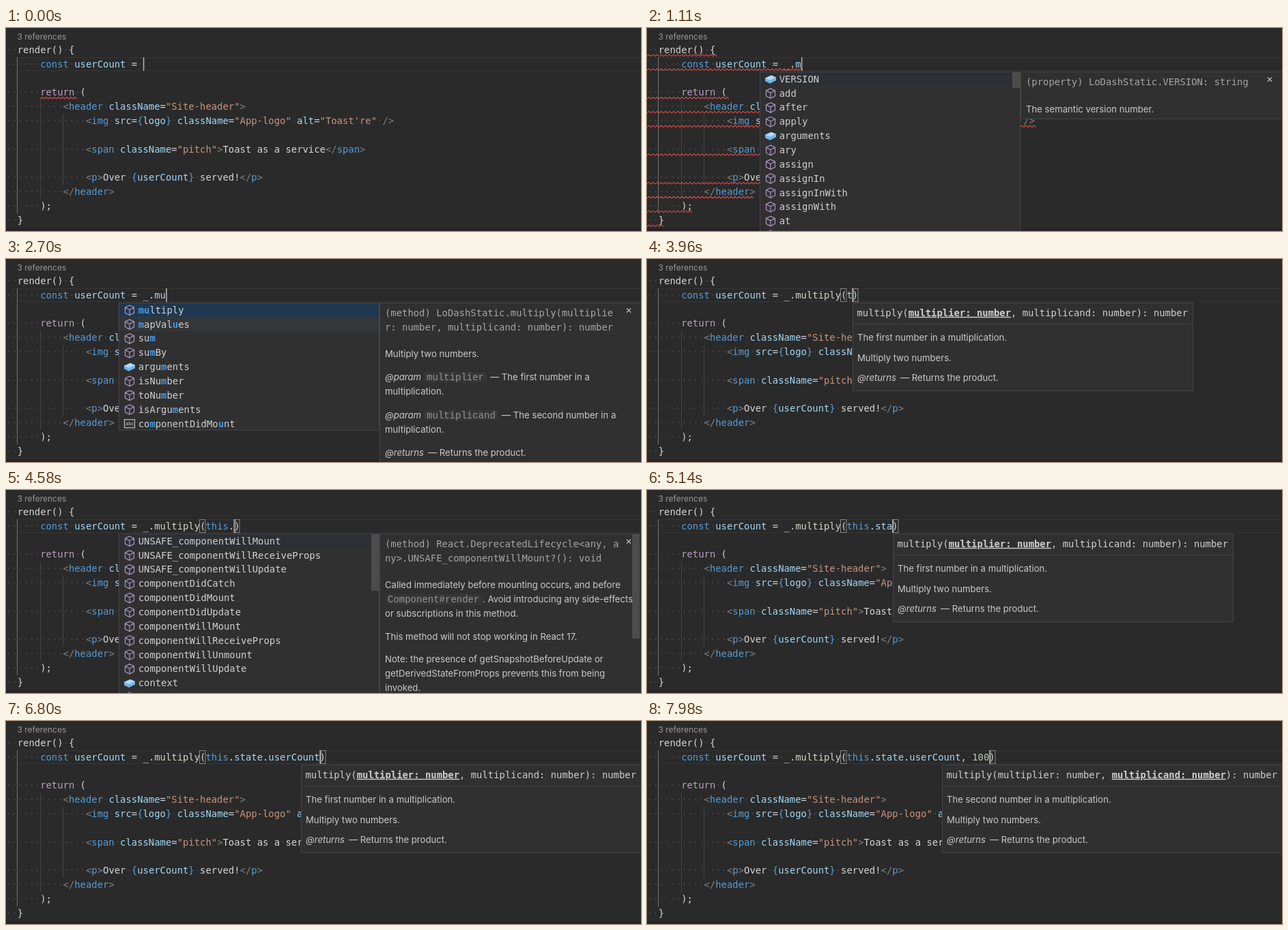
These frames come from a looping animation (930x298 px, 8000 ms). An HTML page:

```html
<!DOCTYPE html>
<html lang="en">
<head>
<meta charset="utf-8">
<title>Editor autocomplete</title>
<style>
html, body { margin: 0; width: 100%; height: 100%; overflow: hidden; background: #2a2a2a; }
svg { display: block; width: 930px; height: 298px; }
text { white-space: pre; fill: #d0d0d0; }
.mono { font: 13.887px "DejaVu Sans Mono", monospace; }
.sans { font: 13.15px Inter, sans-serif; fill: #cacaca; }
.ital { font-style: italic; }
.pill { font: 14px "Liberation Mono", monospace; fill: #959595; }
.lens { font: 12px Inter, sans-serif; fill: #999; }
.dim { fill: #a6a6a6; }
.w { fill: #d6d6d6; } .b { fill: #569cd6; } .v { fill: #a2d8f4; } .f { fill: #d4d5c6; }
.k { fill: #b8a0bc; } .s { fill: #c8957e; } .g { fill: #808080; } .n { fill: #b9c8ae; }
.dot { fill: #444; }
.hit { fill: #429ae8; font-weight: bold; }
.on { font-weight: bold; text-decoration: underline; }
.panel { fill: #303031; stroke: #454545; }
.thumb { fill: #4c4c4d; }
.wave { fill: none; stroke: #d84848; stroke-width: 1.1; }
</style>
</head>
<body>
<svg viewBox="0 0 930 298">
  <defs>
    <path id="cube" d="M0-7 6.5-4V4L0 7.5-6.5 4V-4ZM-6.5-4 0-.5 6.5-4M0-.5V7.5" fill="none" stroke="#a68fbc" stroke-width="1.3"/>
    <g id="brick">
      <path d="M-8-1.500 1-5.500 8-2.500V2L-1 6.500-8 3Z" fill="#72b3ea"/>
      <path d="M-8-1.500 1-5.500 8-2.500-1 1.500Z" fill="#b4daf6"/>
    </g>
    <g id="abc">
      <rect x="-7.5" y="-6" width="15" height="12" fill="none" stroke="#bbb" stroke-width="1.2"/>
      <text x="-6" y="2.6" style="font: 7px 'DejaVu Sans', sans-serif">abc</text>
    </g>
  </defs>
  <g id="stage"></g>
</svg>
<script>
const LOOP = 8000, CH = 8.361, LEFT = 16.7, ROW = 20.84, BASE = 4.8;
const rowY = i => 32 + i * ROW;

// "~x" switches to colour class x
const CODE = [
  "~wrender() {", null, null,
  "    ~kreturn ~w(",
  "        ~g<~bheader ~vclassName~w=~s\"Site-header\"~g>",
  "            ~g<~bimg ~vsrc~w=~b{~vlogo~b} ~vclassName~w=~s\"App-logo\" ~valt~w=~s\"Toast're\" ~g/>",
  null,
  "            ~g<~bspan ~vclassName~w=~s\"pitch\"~g>~wToast as a service~g</~bspan~g>",
  null,
  "            ~g<~bp~g>~wOver ~b{~vuserCount~b} ~wserved!~g</~bp~g>",
  "        ~g</~bheader~g>",
  "    ~w);", "~w}"
];

// [time, text before the caret, open popups]
const STEPS = [
  [0, ""], [240, "_"], [480, "_."], [560, "_.", "all"], [1030, "_.m", "all"], [1270, "_.mu", "mu"],
  [2780, "_.multiply"], [3000, "_.multiply(", "sig"], [3880, "_.multiply(t", "sig"],
  [4040, "_.multiply(th", "sig"], [4120, "_.multiply(thi", "sig"], [4200, "_.multiply(this", "sig"],
  [4360, "_.multiply(this.", "sig"], [4440, "_.multiply(this.", "sig life"],
  [4900, "_.multiply(this.s", "sig"], [4980, "_.multiply(this.st", "sig"],
  [5060, "_.multiply(this.sta", "sig"], [5220, "_.multiply(this.stat", "sig"],
  [5300, "_.multiply(this.state", "sig"], [5460, "_.multiply(this.state.", "sig"],
  [5620, "_.multiply(this.state.", "sig state"],
  [6560, "_.multiply(this.state.userCount", "sig"],
  [7360, "_.multiply(this.state.userCount,", "sig"], [7440, "_.multiply(this.state.userCount, ", "sig"],
  [7660, "_.multiply(this.state.userCount, 1", "sig"], [7740, "_.multiply(this.state.userCount, 10", "sig"],
  [7900, "_.multiply(this.state.userCount, 100", "sig"]
];

// Items: "=" marks a property, "#" a plain word, [x] a matched letter
const LISTS = {
  all: {
    items: "=VERSION add after apply =arguments ary assign assignIn assignInWith assignWith at attempt",
    fill: "#2c2f33", thumb: 24, bottom: 134,
    docs: [[555, 79, "mono dim", "(property) LoDashStatic.VERSION: string"],
      [555, 119, "sans", "The semantic version number."]]
  },
  mu: {
    items: "[mu]ltiply [m]apVal[u]es su[m] su[m]By =argu[m]ents isNu[m]ber toNu[m]ber isArgu[m]ents #co[m]ponentDidMo[u]nt",
    fill: "#1f3850", hover: true, bottom: 310,
    docs: [[555, 79, "mono dim", "(method) LoDashStatic.multiply(multiplie"],
      [555, 100, "mono dim", "r: number, multiplicand: number): number"],
      [555, 139, "sans", "Multiply two numbers."],
      [555, 173, "sans ital", "@param"], [616, 173, "pill", "multiplier"],
      [709, 173, "sans", "— The first number in a"], [555, 194, "sans", "multiplication."],
      [555, 229, "sans ital", "@param"], [616, 229, "pill", "multiplicand"],
      [726, 229, "sans", "— The second number in a"], [555, 250, "sans", "multiplication."],
      [555, 284, "sans ital", "@returns"], [618, 284, "sans", "— Returns the product."]]
  },
  life: {
    items: "UNSAFE_componentWillMount UNSAFE_componentWillReceiveProps UNSAFE_componentWillUpdate componentDidCatch " +
      "componentDidMount componentDidUpdate componentWillMount componentWillReceiveProps componentWillUnmount " +
      "componentWillUpdate =context forceUpdate",
    fill: "#2c2f33", thumb: 84, bottom: 310, docsThumb: true,
    docs: [[555, 79, "mono dim", "(method) React.DeprecatedLifecycle<any, a"],
      [555, 100, "mono dim", "ny>.UNSAFE_componentWillMount?(): void"],
      [555, 139, "sans", "Called immediately before mounting occurs, and before"],
      [559, 160, "pill", "Component#render"], [698, 160, "sans", ". Avoid introducing any side-effects"],
      [555, 181, "sans", "or subscriptions in this method."],
      [555, 215, "sans", "This method will not stop working in React 17."],
      [555, 248, "sans", "Note: the presence of getSnapshotBeforeUpdate or"],
      [555, 269, "sans", "getDerivedStateFromProps prevents this from being"],
      [555, 290, "sans", "invoked."]]
  },
  state: {
    items: "=userCount #Component #React #SiteHeader #_ #alt #api #className #componentDidMount #getUserCount #header #img",
    fill: "#1f3850", thumb: 136, bottom: 104,
    docs: [[555, 79, "mono dim", "(property) userCount: any"]]
  }
};

const esc = s => s.replace(/&/g, "&amp;").replace(/</g, "&lt;");
const raw = (x, y, cls, html) => `<text x="${x}" y="${y + BASE}" class="${cls}">${html}</text>`;
const rect = (x, y, w, h, attrs) => `<rect x="${x}" y="${y}" width="${w}" height="${h}" ${attrs}/>`;
const panel = (x, y, w, h) => rect(x + .5, y + .5, w - 1, h - 1, 'class="panel"');
const span = (cls, s) => `<tspan class="${cls}">${s}</tspan>`;

function label(x, y, cls, s) {
  const box = cls === "pill" ? rect(x - 4, y - 7, s.length * 8.4 + 8, 15, 'rx="3" fill="#363637"') : "";
  return box + raw(x, y, cls, esc(s));
}

function codeLine(i, src) {
  const html = ("  " + src).split("~").map((part, n) => {
    const body = esc(n ? part.slice(1) : part).replace(/ +/g, m => "\0" + m.length + "\0");
    return span(n ? part[0] : "w", body.replace(/\0(\d+)\0/g, (_, k) => span("dot", "·".repeat(k))));
  }).join("");
  return raw(0, rowY(i), "mono", html);
}

const wave = (x1, x2, y) =>
  `<path class="wave" d="M${x1} ${y}${"l3-2.6 3 2.6".repeat(Math.round((x2 - x1) / 6))}"/>`;

const kindOf = w => w === "this" ? "b" : w === "multiply" ? "f" : w === "_" ? "w" : /^\d/.test(w) ? "n" : "v";
const tint = s => s.replace(/\w+/g, w => `~${kindOf(w)}${w}~w`);

function suggest({ items, fill, hover, thumb, bottom, docs, docsThumb }) {
  const rows = items.split(" ");
  let out = panel(547, 64, 384, bottom - 64) + docs.map(d => label(...d)).join("") +
    '<path d="M909 72.500l6 6m0-6l-6 6" stroke="#b4b4b4" stroke-width="1.4"/>';
  if (docsThumb) out += rect(917, 65, 11, 153, 'class="thumb"');
  out += panel(165, 64, 382, rows.length * ROW) + rect(166, 65, 380, 20, `fill="${fill}"`);
  if (hover) out += rect(166, 85, 380, 21, 'fill="#343638"');
  rows.forEach((item, i) => {
    const y = 75 + i * ROW;
    const icon = { "=": "brick", "#": "abc" }[item[0]] || "cube";
    const name = item.replace(/^[=#]/, "").replace(/\[(\w+)\]/g, (_, m) => span("hit", m));
    out += `<use href="#${icon}" x="181" y="${y}"/>` + raw(193.7, y, "mono", name);
  });
  return out + (thumb ? rect(535, 65, 11, thumb - 1, 'class="thumb"') : "");
}

function signature(caret, second) {
  const x = Math.min(Math.round(caret), 432);
  const params = ["multiplier: number", "multiplicand: number"];
  params[+second] = span("on", params[+second]);
  return panel(x, 64, 499, 130) + rect(x + 1, 95, 497, 1, 'fill="#444"') +
    raw(x + 6.5, 79, "mono", `multiply(${params.join(", ")}): number`) +
    label(x + 7, 115, "sans", `The ${second ? "second" : "first"} number in a multiplication.`) +
    label(x + 7, 145, "sans", "Multiply two numbers.") +
    label(x + 7, 174, "sans ital", "@returns") + label(x + 70, 174, "sans", "— Returns the product.");
}

function draw(typed, popups, errors) {
  const caret = LEFT + CH * (22 + typed.length);
  const call = typed.includes("(");
  const lines = CODE.slice();
  lines[1] = "    ~bconst ~vuserCount ~w= " + tint(typed) + (call ? ")" : "");

  let out = rect(0, 294, 930, 4, 'fill="#2c2127"') +
    rect(17, 43, 913, 1, 'fill="#353535"') + rect(17, 62, 913, 1, 'fill="#353535"') +
    rect(16, 43, 1, 229, 'fill="#747474"') + rect(50, 105, 1, 146, 'fill="#454545"') +
    rect(83, 126, 1, 104, 'fill="#454545"') + raw(16.5, 12.3, "lens", "3 references");
  lines.forEach((src, i) => {
    if (src === null) return;
    out += codeLine(i, src);
    if (errors === "all") out += wave(0, LEFT + CH * src.replace(/~./g, "").length, rowY(i) + 9.5);
  });
  if (errors === "return") out += wave(50, 101, 104);
  if (call) {
    for (const x of [LEFT + CH * 32, caret])
      out += rect(Math.round(x) - .5, 43.5, 8.5, 19, 'fill="none" stroke="#858585"');
  }
  out += rect(caret + .2, 43, 1.5, 20, 'fill="#b4b4b4"');
  for (const name of popups.split(" ").filter(Boolean))
    out += name === "sig" ? signature(caret, typed.includes(",")) : suggest(LISTS[name]);
  return out;
}

const stage = document.getElementById("stage");
let shown = "";
function tick() {
  const t = performance.now() % LOOP;
  const [time, typed, popups = ""] = STEPS.findLast(s => s[0] <= t);
  const errors = t < 950 ? "return" : t < 1430 ? "all" : "";
  const key = time + errors;
  if (key !== shown) {
    stage.innerHTML = draw(typed, popups, errors);
    shown = key;
  }
  requestAnimationFrame(tick);
}
tick();
</script>
</body>
</html>
```
